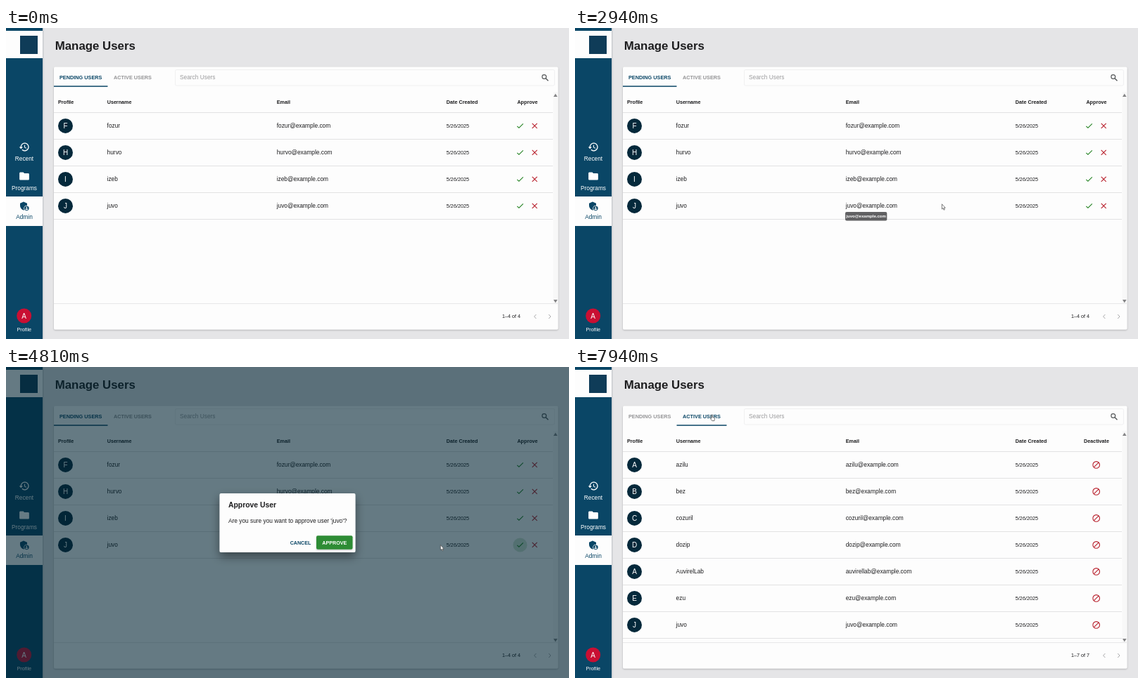
Write an HTML page that moves like this. It is 800 px wide and 443 px high and loops after 8000 ms.

```html
<!DOCTYPE html>
<html lang="en">
<head>
<meta charset="utf-8">
<title>Manage Users</title>
<style>
  html, body { margin: 0; width: 100%; height: 100%; overflow: hidden; background: #e5e5e7; }
  svg { display: block; width: 100vw; height: 100vh; font-family: "Liberation Sans", Arial, sans-serif; }
</style>
</head>
<body>
<svg id="stage" viewBox="0 0 800 443"></svg>
<script>
const NAVY = '#0a4666', INK = '#1d1d1f', DARK = '#04293b', GREEN = '#21801f', RED = '#b8202c';
const LOOP = 8000;
const stage = document.getElementById('stage');

const text = (x, y, size, str, fill = INK, extra = '') =>
  `<text x="${x}" y="${y}" font-size="${size}" fill="${fill}" ${extra}>${str}</text>`;
const bold = (x, y, size, str, fill = INK, extra = '') =>
  text(x, y, size, str, fill, `font-weight="700" ${extra}`);
const middle = 'text-anchor="middle"';
const rect = (x, y, w, h, fill, extra = '') =>
  `<rect x="${x}" y="${y}" width="${w}" height="${h}" fill="${fill}" ${extra}/>`;
const line = (d, color, width = 1, extra = '') =>
  `<path d="${d}" fill="none" stroke="${color}" stroke-width="${width}" ${extra}/>`;
const circle = (x, y, r, fill, extra = '') =>
  `<circle cx="${x}" cy="${y}" r="${r}" fill="${fill}" ${extra}/>`;
// 24-unit icon centred on a point
const icon = (x, y, size, body) =>
  `<g transform="translate(${x - size / 2} ${y - size / 2}) scale(${size / 24})">${body}</g>`;

const avatar = (x, y, letter, fill) =>
  circle(x, y, 10.5, fill) + text(x, y + 3.6, 10, letter, '#fff', middle);

const check = y => icon(730.5, y, 12.6,
  `<path fill="${GREEN}" d="M9 16.2 4.8 12l-1.4 1.4L9 19 21 7l-1.4-1.4z"/>`);
const cross = y => line(`M747.7 ${y - 3.5}l7 7m0-7l-7 7`, RED, 1.1);
const block = y => circle(740.7, y, 4.8, 'none', `stroke="${RED}" stroke-width="1.1"`) +
  line(`M737.4 ${y + 3.3}l6.6-6.6`, RED, 1.1);

function userRow(name, index, actions) {
  const y = 139.4 + index * 38;
  return `<g>${avatar(84.5, y, name[0].toUpperCase(), DARK)}
    ${text(143.6, y + 3, 8.33, name)}
    ${text(384.7, y + 3, 8.33, name.toLowerCase() + '@example.com')}
    ${text(625.8, y + 2.6, 7.25, '5/26/2025')}
    ${actions(y)}${line(`M68 ${y + 19.1}H777`, '#e2e2e3')}</g>`;
}

const pending = ['fozur', 'hurvo', 'izeb', 'juvo'];
const active = ['azilu', 'bez', 'cozuril', 'dozip', 'AuvirelLab', 'ezu', 'juvo'];

const sidebar = rect(0, 0, 52, 443, NAVY) +
  rect(0, 4, 52, 39, '#fdfdfd') + rect(20, 11, 25, 26, '#0f3c58') +
  icon(26, 169.5, 16, `<path fill="#fff" d="M13 3c-4.97 0-9 4.03-9 9H1l4 4 4-4H6c0-3.87 3.13-7 7-7s7 3.13 7 7-3.13 7-7 7c-1.93 0-3.68-.79-4.94-2.06l-1.42 1.42C8.27 20 10.5 21 13 21c4.97 0 9-4.03 9-9s-4.03-9-9-9zm-1 5v5l4.3 2.5.7-1.2-3.5-2.1V8z"/>`) +
  text(26, 189, 8.33, 'Recent', '#fff', middle) +
  icon(26, 211, 16.5, `<path fill="#fff" d="M10 4H4c-1.1 0-2 .9-2 2v12c0 1.1.9 2 2 2h16c1.1 0 2-.9 2-2V8c0-1.1-.9-2-2-2h-8z"/>`) +
  text(26, 230.6, 8.33, 'Programs', '#fff', middle) +
  rect(0, 240, 52, 42, '#fdfdfd') +
  icon(26, 253.5, 16, `<path fill="${NAVY}" d="M17 11l1 .1V6.3L10.5 3 3 6.3v4.9c0 4.5 3.2 8.8 7.5 9.8l1.6-.5A6 6 0 0 1 17 11z"/>` +
    circle(17, 17, 5, NAVY) + circle(17, 15.4, 1.4, '#fff') +
    '<path fill="#fff" d="M14 19.2c1-2 5-2 6 0-1.5 2-4.5 2-6 0z"/>') +
  text(26, 272.3, 8.33, 'Admin', NAVY, middle) +
  avatar(25.7, 410, 'A', '#c90f33') + text(25.8, 432, 7.25, 'Profile', '#fff', middle);

const panel = rect(68, 55.5, 716.5, 374, '#fdfdfd', 'rx="2" filter="url(#soft)"') +
  bold(76, 73, 7.3, 'PENDING USERS', NAVY, 'id="tabPending"') +
  bold(153, 73, 7.3, 'ACTIVE USERS', '#949496', 'id="tabActive"') +
  rect(68, 82.3, 76.5, 1.5, NAVY, 'id="underline"') +
  rect(240.5, 59.5, 539, 22.5, 'none', 'rx="2" stroke="#f0f0f1"') +
  text(247, 73.2, 8.33, 'Search Users', '#9b9b9d') +
  circle(764.8, 69.5, 2.9, 'none', 'stroke="#55585a" stroke-width="1.2"') +
  line('M767 71.7l3.5 3.5', '#55585a', 1.4) +
  bold(74, 108, 7.2, 'Profile') + bold(143.7, 108, 7.2, 'Username') +
  bold(384.8, 108, 7.2, 'Email') + bold(625.8, 108, 7.25, 'Date Created') +
  bold(741, 108, 7.2, 'Approve', INK, `id="actionTitle" ${middle}`) +
  line('M68 120.5H777', '#e2e2e3') +
  rect(777.5, 91, 6.5, 302, '#f8f8f8') +
  '<path fill="#858587" d="M778 98l2.8-4.6 2.8 4.6zM778 387l2.8 4.6 2.8-4.6z"/>' +
  line('M68 392.7H784', '#e6e6e7') +
  text(705, 413.4, 7.2, '', INK, 'id="count"') +
  line('M753.4 408l-2.8 3 2.8 3M771.2 408l2.8 3-2.8 3', '#a9a9ab') +
  `<g id="pending">${circle(730.5, 253.5, 0, GREEN, 'id="ripple" opacity=".2"')}
    ${pending.map((n, i) => userRow(n, i, y => check(y) + cross(y))).join('')}</g>
  <g id="active">${active.map((n, i) => userRow(n, i, block)).join('')}</g>`;

const tooltip = `<g id="tooltip">${rect(384, 262, 59.3, 12.6, '#616163', 'rx="2"')}
  ${bold(413.6, 270.2, 6.05, 'juvo@example.com', '#fff', middle)}</g>`;

const dialog = `<g id="dialog">${rect(0, 0, 800, 443, 'rgb(0,35,50)', 'opacity=".6"')}
  ${rect(303.5, 180, 193, 84, '#fdfdfd', 'rx="2" filter="url(#deep)"')}
  ${bold(316, 200, 10.4, 'Approve User')}
  ${text(316, 222.2, 8.33, "Are you sure you want to approve user 'juvo'?")}
  ${bold(418.5, 252.5, 7.1, 'CANCEL', NAVY, middle)}
  ${rect(441, 240.2, 51.5, 19.5, '#2f8c35', 'rx="2" filter="url(#soft)"')}
  ${bold(466.8, 252.5, 7.15, 'APPROVE', '#fff', middle)}</g>`;

const cursor = `<g id="cursor" stroke="#444" stroke-width=".7" stroke-linejoin="round" fill="#fff">
  <path id="arrow" d="M.4.2v7.2l1.6-1.4 1.1 2.6 1.2-.5-1.1-2.5h2.1z"/>
  <path id="hand" d="M.4.8c0-1 1.3-1 1.3 0v2.8l2.6.6q.8.2.7 1l-.5 3.4H1.2L-1 5.6c-.5-.9.4-1.2 1.4-.4z"/></g>`;

stage.innerHTML = `<defs>
  <filter id="soft" x="-10%" y="-10%" width="120%" height="120%"><feDropShadow dx="0" dy="1" stdDeviation="1" flood-opacity=".25"/></filter>
  <filter id="deep" x="-20%" y="-30%" width="140%" height="180%"><feDropShadow dx="0" dy="6" stdDeviation="7" flood-opacity=".45"/></filter>
  </defs>${rect(0, 0, 800, 443, '#e5e5e7')}${rect(51, 0, 2.5, 443, '#c9cccf')}
  ${sidebar}${bold(69.7, 31, 16.85, 'Manage Users')}${panel}${tooltip}${dialog}${cursor}`;

const el = Object.fromEntries([...stage.querySelectorAll('[id]')].map(n => [n.id, n]));
const lastPending = el.pending.lastElementChild;

const progress = (t, from, to) => Math.min(1, Math.max(0, (t - from) / (to - from)));
const smooth = p => p * p * (3 - 2 * p);
const easeOut = p => 1 - (1 - p) ** 3;
const mix = (a, b, p) => a + (b - a) * p;
const show = (node, on) => node.setAttribute('display', on ? 'inline' : 'none');
const set = (node, attrs) => {
  for (const key in attrs) node.setAttribute(key, attrs[key]);
};

// time, x, y of the pointer tip
const route = [
  [1350, 531, -12], [1860, 530.5, 111.6], [1980, 530.5, 112], [2700, 521, 250.6],
  [3250, 521, 250.6], [4150, 727.5, 254], [4665, 727.5, 254],
  [4995, 460.5, 252.4], [5900, 460.5, 252.4], [6750, 193.5, 68]
];
function pointerAt(t) {
  const next = route.findIndex(stop => stop[0] > t);
  if (next <= 0) return (next ? route[route.length - 1] : route[0]).slice(1);
  const [a, b] = [route[next - 1], route[next]];
  const p = smooth(progress(t, a[0], b[0]));
  return [mix(a[1], b[1], p), mix(a[2], b[2], p)];
}

const OPEN = 4670, CLOSE = 5320, REMOVED = 5560, SWITCH = 6900;

function render(t) {
  const [x, y] = pointerAt(t);
  const switched = t >= SWITCH, removed = t >= REMOVED;

  el.cursor.setAttribute('transform', `translate(${x} ${y})`);
  const overCheck = x > 722 && y > 240;
  const overButton = t > OPEN && t < CLOSE + 150 && x < 492;
  const overTab = t > 6000 && y < 82;
  const pointing = overCheck || overButton || overTab;
  show(el.hand, pointing);
  show(el.arrow, !pointing);

  el.tooltip.setAttribute('opacity', progress(t, 2720, 2900) * (1 - progress(t, 3650, 3800)));
  el.dialog.setAttribute('opacity', easeOut(progress(t, OPEN, OPEN + 140)) * (1 - progress(t, CLOSE, CLOSE + 200)));
  el.ripple.setAttribute('r', removed ? 0 : 10 * progress(t, 4550, 4690));

  show(lastPending, !removed);
  show(el.pending, !switched);
  show(el.active, switched);
  el.count.textContent = switched ? '1–7 of 7' : removed ? '1–3 of 3' : '1–4 of 4';
  el.actionTitle.textContent = switched ? 'Deactivate' : 'Approve';

  set(el.tabPending, { fill: switched ? '#949496' : NAVY });
  set(el.tabActive, { fill: switched ? NAVY : '#949496' });
  const slide = smooth(progress(t, SWITCH, SWITCH + 300));
  set(el.underline, { x: mix(68, 144.5, slide), width: mix(76.5, 71, slide) });
}

const start = performance.now();
function tick() {
  render((performance.now() - start) % LOOP);
  requestAnimationFrame(tick);
}
tick();
</script>
</body>
</html>
```
